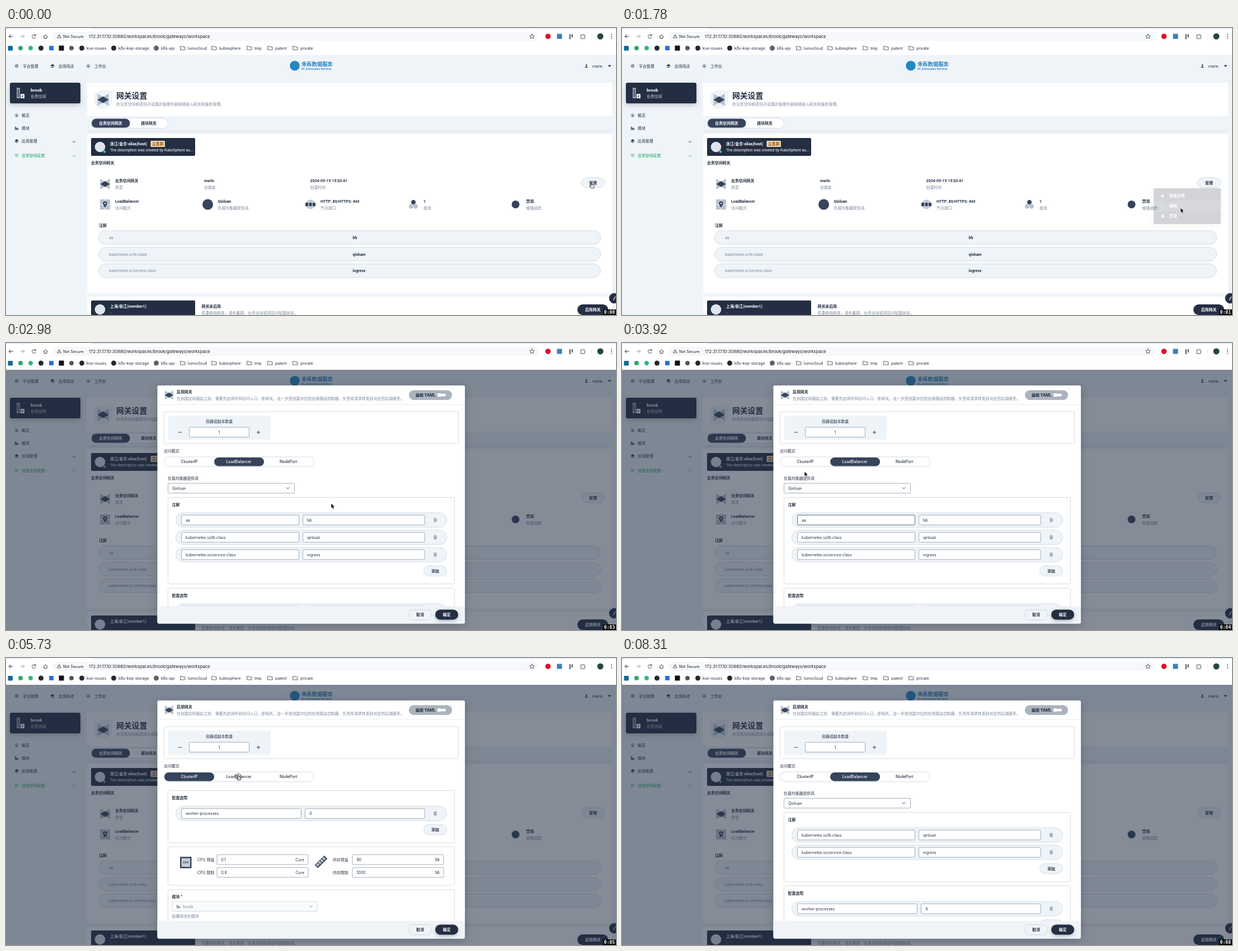
An HTML page for the animation above (8910 ms loop, 1090 by 514 pixels).

```html
<!DOCTYPE html>
<html lang="zh-CN">
<head>
<meta charset="utf-8">
<title>Gateway settings</title>
<style>
html, body { margin: 0; width: 100%; height: 100%; overflow: hidden; background: #eff4f9; }
svg { display: block; }
text { font-family: Roboto, "Noto Sans CJK SC", "Noto Sans CJK", sans-serif; white-space: pre; }
.ui text { font-family: Inter, "Noto Sans CJK SC", "Noto Sans CJK", sans-serif; }
#clock { font-family: "DejaVu Sans Mono", monospace; }
.hover .first { stroke: #36435c; }
#menu { filter: drop-shadow(0 3px 6px rgba(36, 46, 66, .25)); }
</style>
</head>
<body>
<svg id="stage" width="1090" height="514" viewBox="0 0 1090 514"></svg>
<script>
const LOOP = 8910, STEP = 150;
const INK = '#242e42', SLATE = '#36435c', GREY = '#79879c', LINE = '#ccd3db', PALE = '#eff4f9', MIST = '#b6c2cd';
const WORKSPACE = 'brook', USER = 'marlo', PROVIDER = 'Qinluan';

// Shapes; text is placed by its vertical middle
const box = (x, y, w, h, r = 0, fill = '#fff', stroke = 'none', extra = '') =>
  `<rect x="${x}" y="${y}" width="${w}" height="${h}" rx="${r}" fill="${fill}" stroke="${stroke}" stroke-width=".8" ${extra}/>`;
const dot = (x, y, r, fill, stroke = 'none') =>
  `<circle cx="${x}" cy="${y}" r="${r}" fill="${fill}" stroke="${stroke}"/>`;
const path = (d, stroke = INK, width = 1, fill = 'none') =>
  `<path d="${d}" fill="${fill}" stroke="${stroke}" stroke-width="${width}" stroke-linecap="round" stroke-linejoin="round"/>`;
const solid = (d, fill = INK) => `<path d="${d}" fill="${fill}"/>`;
const at = (x, y, content, scale = 1) => `<g transform="translate(${x} ${y}) scale(${scale})">${content}</g>`;
const text = (x, y, s, { size = 6.9, fill = INK, weight = 400, anchor = 'start' } = {}) =>
  `<text x="${x}" y="${y + size * .37}" font-size="${size}" fill="${fill}" font-weight="${weight}" text-anchor="${anchor}">${s}</text>`;
const bold = (x, y, s, opt) => text(x, y, s, { weight: 700, ...opt });
const grey = (x, y, s) => text(x, y, s, { fill: GREY });
const middle = (x, y, s, opt) => text(x, y, s, { anchor: 'middle', weight: 600, ...opt });
const chevron = (x, y, color = INK) => path(`M${x - 2.3} ${y - 1.2}l2.3 2.4 2.3-2.4`, color, .9);
const button = (x, y, w, h, label, dark) =>
  box(x, y, w, h, h / 2, dark ? INK : PALE, dark ? 'none' : LINE) +
  middle(x + w / 2, y + h / 2, label, { fill: dark ? '#fff' : INK });
const pair = (x, y, title, note) => bold(x, y, title) + grey(x, y + 11.5, note);

// Icons
const gateway = (x, y, scale) => at(x, y,
  solid('M-10-11L0-5 10-11V11L0 5-10 11z', MIST) + solid('M-10 0L0-6 10 0 0 6z', SLATE), scale);
const gear = (x, y, color) => dot(x, y, 2.5, 'none', color) + dot(x, y, .9, color);
const layers = (x, y) => solid(`M${x - 3.5} ${y - 1}l3.5-2.2 3.5 2.2-3.5 2z`) + path(`M${x - 3} ${y + 1.2}l3 1.6 3-1.6`);
const gauge = (x, y) => dot(x, y, 2.9, 'none', GREY) + solid(`M${x} ${y - 2}l1.3 3.6h-2.6z`);
const blocks = (x, y, c = SLATE) => box(x - 3, y - 3, 1.6, 6, 0, c) + box(x - .8, y - 1, 1.8, 4, 0, c) + box(x + 1.6, y, 1.6, 3, 0, c);
const person = (x, y) => dot(x, y - 1.6, 1.5, SLATE) + solid(`M${x - 3} ${y + 3}q3-4.5 6 0z`, SLATE);
const hexagon = (x, y, fill) => solid(`M${x} ${y - 4.4}l3.8 2.2v4.4l-3.8 2.2-3.8-2.2v-4.4z`, fill);
const folder = (x, y) => path(`M${x - 4} ${y - 3.2}h3l1 1.2h4v5h-8z`, '#474b50', .9);
const trash = (x, y) => path(`M${x - 2.6} ${y - 2}h5.2M${x - 1} ${y - 3.2}h2`, GREY, .9) +
  path(`M${x - 2} ${y - .8}v3.8h4v-3.8M${x} ${y - .8}v3.4`, GREY, .8, '#c7cfd8');

function browser() {
  const dark = '#3c4043';
  const marks = [[135, 'kse-issues'], [192, 'k8s-kep-storage'], [268, 'k8s-api']];
  const folders = [[316, 'lumocloud'], [372, 'kubesphere'], [435, 'tmp'], [472, 'patent'], [517, 'private']];
  return `<g class="ui">${box(0, 0, 1090, 48)}${box(0, 0, 1090, 1.2, 0, '#d3e3fd')}${box(46, 0, 108, 1.2)}` +
    box(84, 7, 868, 16, 8, '#f6f8fc') + box(87, 9, 56, 12, 6, '#fff', '#e3e6ea') +
    path('M12 15H5.5M8.3 12l-3 3 3 3') + path('M26 15h6.5M29.7 12l3 3-3 3', '#9a9da1') +
    path('M52.5 13a3.3 3.3 0 1 0 .5 3.3M53 11.4v2.2h-2.3', dark) +
    path('M67 15l3.5-3.2 3.5 3.2M68 14.5v4h5v-4', dark) +
    path('M95 11.8l3.4 6h-6.8zM95 14v1.7', INK, .8) +
    text(102, 15, 'Not Secure', { weight: 500 }) +
    text(148, 15, `172.31.17.10:30880/workspaces/${WORKSPACE}/gateways/workspace`, { size: 7.7, fill: '#1f1f1f' }) +
    path('M940 10.8l1.2 2.8 3 .3-2.3 2 .7 3-2.6-1.6-2.6 1.6.7-3-2.3-2 3-.3z', dark, .8) +
    dot(968.5, 15, 4.8, '#e0112b') + box(984.5, 10.5, 9, 9, 1, '#3f7fb5') +
    [0, 1, 2, 3, 4].map(i => box(1006.5 + i % 2 * 4, 11.5 + (i >> 1) * 3, 2.5, 2.2, 0, dark)).join('') +
    path('M1027.5 12.5h2a1.2 1.2 0 0 1 2.4 0h2v2.3a1.2 1.2 0 0 1 0 2.4v1.8h-6.4z', dark, .9) +
    box(1046, 10, .7, 10, 0, '#d3e3fd') + dot(1062, 15, 5.5, '#26473f') +
    [11.5, 15, 18.5].map(y => dot(1082, y, .9, dark)).join('') +
    box(3.5, 32, 8.5, 8.5, 1, '#126b9c') + dot(26, 36, 4, '#2da66c') + dot(44, 36, 4, '#35b87d') +
    dot(62.5, 36, 4.5, '#24292f') + box(77, 32, 8, 8, 1, '#2870dd') + box(94.5, 31.5, 9, 9, 0, '#111') +
    dot(117, 36, 4, '#55585c') + marks.map(([x, s], i) => dot(x + .5, 36, 4.5, i < 2 ? '#24292f' : '#5f6368') + text(x + 9, 36, s)).join('') +
    folders.map(([x, s]) => folder(x, 36) + text(x + 9, 36, s)).join('') + '</g>';
}

function sidebar() {
  const green = '#55bc8a';
  return box(7, 98, 126, 37, 3, INK, 'none', 'style="filter:drop-shadow(0 3px 4px rgba(36,46,66,.25))"') +
    box(19, 107, 6, 19, 0, '#8f9bab') + box(20.5, 110, 3, 13, 0, '#5d6b80') + box(26, 118, 7, 8, 1, '#fff') +
    dot(29.5, 122, 1.3, INK) + bold(44, 111, WORKSPACE, { size: 8, fill: '#fff' }) + text(44, 122.5, '业务空间', { fill: '#d5dce4' }) +
    gauge(19, 156.5) + text(28, 156.5, '概览') + blocks(19, 179.5) + text(28, 179.5, '模块') +
    layers(19, 202.5) + text(28, 202.5, '应用管理') + chevron(121.5, 204) +
    gear(19, 228, green) + bold(28, 228, '业务空间设置', { fill: green }) + chevron(121.5, 229, green);
}

function page() {
  const annotations = [['aa', 'bb'], ['kubernetes.io/lb.class', PROVIDER.toLowerCase()], ['kubernetes.io/service.class', 'ingress']];
  return box(0, 48, 1090, 466, 0, PALE) +
    gear(19, 68, SLATE) + text(30, 68, '平台管理') + layers(83, 68) + text(94, 68, '应用商店') +
    gauge(147, 68) + text(158, 68, '工作台') +
    dot(516, 67.5, 8.8, '#2388c6') + bold(528, 65, '禾栎数据服务', { size: 9.3, fill: '#1f7fbd' }) +
    text(528, 73.5, 'HL Informatics Services', { size: 5, fill: '#1f7fbd', weight: 500 }) +
    person(1037, 68) + text(1048, 68, USER) + solid('M1075.5 66.5h6l-3 3.4z') +
    sidebar() +
    box(145, 98, 938, 60) + solid('M157 128q0-17 17-17h16v17q0 17-17 17-16 0-16-17z', PALE) + gateway(173.5, 128.5, 1) +
    bold(197, 121, '网关设置', { size: 13.8 }) + grey(197, 136, '在业务空间和项目中设置并管理外部网络接入网关和服务管理。') +
    box(145, 183, 938, 4, 0, '#e6ecf2') +
    box(152.5, 161.5, 137, 18, 9, '#fff', LINE) + box(153, 162.5, 68.5, 16, 8, SLATE) +
    middle(187, 170.5, '业务空间网关', { fill: '#fff', weight: 700 }) + middle(255, 170.5, '模块网关', { weight: 700 }) +
    box(145, 190, 938, 285) +
    box(152, 197, 186, 32, 2, INK) + dot(168, 213, 9.3, '#dfe5ec') + dot(176, 221.5, 2.3, '#55bc8a') +
    bold(186, 207, '浙江/金华-alias(host)', { fill: '#fff' }) + box(258.5, 202, 25.5, 11, 1, '#f5d9ad') +
    middle(271.2, 207.5, '主集群', { fill: '#8d5b23' }) +
    text(186, 218.5, 'The description was created by KubeSphere au...', { fill: '#fff' }) +
    bold(152, 241.5, '业务空间网关') +
    gateway(177, 279.5, .86) + pair(195, 273.5, '业务空间网关', '类型') + pair(354, 273.5, USER, '创建者') +
    pair(543.5, 273.5, '2024-09-19 15:20:41', '创建时间') + button(1028.5, 268, 41, 18, '管理') +
    [0, 1, 2, 3].map(i => box(168 + i % 2 * 9.5, 307 + (i >> 1) * 9.5, 8.5, 8.5, 0, MIST)).join('') +
    solid('M177 322l-3.2-6a3.7 3.7 0 1 1 6.4 0z', SLATE) + dot(177, 314.3, 1.2, '#fff') + pair(195, 310.5, 'LoadBalancer', '访问模式') +
    dot(360.5, 316, 9.5, SLATE) + pair(378.5, 310.5, PROVIDER, '负载均衡器提供商') +
    dot(544, 316, 8.5, MIST) + [0, 1, 2].map(i => box(535 + i * 6.3, 313, 5.4, 6, 0, SLATE)).join('') +
    path('M541 308v16M547 308v16', '#fff', .8) + pair(562, 310.5, 'HTTP: 80/HTTPS: 443', '节点端口') +
    hexagon(728, 312, SLATE) + hexagon(723.8, 319.5, MIST) + hexagon(732, 319.5, MIST) + pair(746, 310.5, '1', '副本') +
    dot(910.5, 316, 7, SLATE) + pair(929.5, 310.5, '禁用', '链路追踪') +
    bold(166, 353, '注解') +
    annotations.map(([key, value], i) => {
      const y = 363 + i * 29.7;
      return box(165.5, y, 897, 24.6, 12.3, PALE, LINE) + grey(184, y + 12.5, key) + bold(619.5, y + 12.5, value);
    }).join('') +
    box(145, 481, 938, 33) + box(152, 488, 186, 30, 2, INK) + dot(168, 504, 9.3, '#dfe5ec') +
    bold(186, 498.5, '上海/张江(member1)', { fill: '#fff' }) + text(186, 510, '-', { fill: '#fff' }) +
    bold(349.5, 498.5, '网关未启用') + grey(349.5, 510, '若要使用网关，请在集群、业务空间或项目中配置网关。') +
    button(1021, 495, 55, 19, '启用网关', true) +
    dot(1087, 484, 9.3, INK) + path('M1085.5 487l3-5.5', '#fff', 1.2);
}

function menu() {
  const white = '#fff';
  return box(950, 287, 120, 64, 2, INK) + box(950, 310, 120, 18, 0, SLATE) +
    dot(966, 300.5, 2.3, white) + path('M964 320.5l3.8-4', white) + box(964.3, 334.5, 4, 5, 0, white) +
    ['查看详情', '编辑', '禁用'].map((s, i) => text(978, 300.5 + i * 18.2, s, { fill: white, weight: 600 })).join('');
}

// Dialog parts
const field = (x, y, w, value, extra = '') => box(x, y - 8.8, w, 17.6, 1.5, '#fff', '#8d99aa', extra) + text(x + 7.5, y, value);
const frame = (y, h) => box(289.5, y, 512, h, 2, '#fff', LINE);
const row = (y, key, value, split, extra) =>
  box(303.5, y - 13, 484, 26, 13, PALE, LINE) + field(313.5, y, split - 313.5, key, extra) +
  field(split + 7, y, 741 - split, value) + trash(767, y);
const addButton = y => button(746.5, y - 9, 41, 18, '添加');
const options = y => frame(y, 93.5) + bold(296.5, y + 13, '配置选项') +
  row(y + 41, 'worker-processes', '4', 527.5) + addButton(y + 70);

function modes(active) {
  return box(282.5, 204, 268, 17.5, 8.7, '#fff', LINE) + box(283 + active * 89, 205, 89, 15.5, 7.7, SLATE) +
    ['ClusterIP', 'LoadBalancer', 'NodePort'].map((s, i) =>
      middle(327.5 + i * 88.6, 212.8, s, { fill: i === active ? '#fff' : INK, weight: 500 })).join('');
}

function balancer(rows) {
  const end = 338.5 + rows.length * 31;
  return modes(1) + text(289, 242.5, '负载均衡器提供商') + field(289.5, 260, 226, PROVIDER) + chevron(503.5, 260) +
    frame(276.5, end - 276.5) + bold(296.5, 289, '注解') +
    rows.map(([key, value], i) => row(317 + i * 31, key, value, 523.5, i ? '' : 'class="first"')).join('') +
    addButton(end - 23.3) + options(end + 7.5);
}

function clusterIp() {
  const limit = (x, y, label, value, unit) => text(x, y, label) + field(x + 35, y, 163, value) +
    text(x + 191, y, unit, { anchor: 'end' });
  return modes(0) + options(237.5) + frame(338, 69) +
    box(311, 356, 20.5, 20.5, 1, SLATE) + box(313.5, 358.5, 15.5, 15.5, 0, '#c3cdd8') + middle(321.2, 366, 'CPU', { size: 5 }) +
    limit(342, 361, 'CPU 预留', '0.1', 'Core') + limit(342, 384, 'CPU 限制', '0.8', 'Core') +
    `<g transform="rotate(-45 563 365)">${box(551, 361, 24, 8, 0, SLATE)}${[0, 1, 2, 3].map(i => box(553 + i * 5.3, 362, 4, 5, 0, MIST)).join('')}</g>` +
    limit(584, 361, '内存预留', '90', 'Mi') + limit(584, 384, '内存限制', '1000', 'Mi') +
    frame(415, 80) + bold(296.5, 427.5, '模块 <tspan fill="#ca2621">*</tspan>') +
    box(296.5, 436, 260, 17.5, 1.5, '#f9fbfd', LINE) + blocks(308, 445, GREY) + grey(316, 445, WORKSPACE) +
    chevron(545, 445, GREY) + grey(296.5, 462, '部署网关的模块');
}

function dialog() {
  const pairs = [['aa', 'bb'], ['kubernetes.io/lb.class', PROVIDER.toLowerCase()], ['kubernetes.io/service.class', 'ingress']];
  return box(0, 48, 1090, 466, 0, INK, 'none', 'opacity=".55"') +
    box(270.5, 76, 549.5, 426.5, 3, '#fff', 'none', 'style="filter:drop-shadow(0 4px 8px rgba(36,46,66,.3))"') +
    box(270.5, 110, 549.5, .8, 0, '#e3e9ef') + gateway(291.3, 93.3, .75) +
    bold(305, 87, '启用网关') + grey(305, 99, '在创建应用路由之前，需要先启用外网访问入口，即网关。这一步是创建对应的应用路由控制器，负责将请求转发到对应的后端服务。') +
    box(720, 84.5, 77, 17.5, 8.7, '#abb4be') + bold(732, 93.3, '编辑 YAML') + box(774, 91, 12, 4.6, 2.3, '#fff') + dot(774, 93.3, 3.2, '#fff') +
    '<g clip-path="url(#view)">' +
    box(282.5, 123, 526, 57.5, 2, '#fff', LINE) + box(289.5, 130, 183.5, 43, 1, PALE) + middle(381, 140, '容器组副本数量', { weight: 400 }) +
    box(327.5, 151, 107, 17.5, 1.5, '#fff', '#8d99aa') + middle(381, 160, '1', { weight: 400 }) +
    path('M308 160h5.5M448.3 160h5.5M451 157.2v5.5', INK, .9) + text(282, 193.5, '访问模式') +
    `<g id="full">${balancer(pairs)}</g><g id="cluster">${clusterIp()}</g><g id="reduced">${balancer(pairs.slice(1))}</g></g>` +
    box(270.5, 471, 549.5, 31.5, 3, '#f0f4f8') + button(719.5, 477.5, 41, 18, '取消') +
    `<g style="filter:drop-shadow(0 2px 3px rgba(36,46,66,.35))">${button(767, 477.5, 41, 18, '确定', true)}</g>`;
}

const pointers = {
  arrow: path('M0 0v9l2-1.9 1.5 3.4 1.6-.7-1.5-3.2h2.8z', '#fff', .7, '#000'),
  hand: path('M-.8.6q.8-1.2 1.6 0v3l3.3.9q1 .4.8 1.8l-.7 3.5h-5l-2.7-3.7q0-1.2 1.2-.7l1.5 1z', '#111', .8, '#fff'),
  beam: path('M-1.5-4Q0-4 0-3V3Q0 4-1.5 4M1.5-4Q0-4 0-3M0 3Q0 4 1.5 4', '#111', .9)
};

const stage = document.getElementById('stage');
stage.innerHTML = '<defs><clipPath id="view"><rect x="270" y="111" width="550" height="360"/></clipPath></defs>' +
  page() + `<g id="menu" class="ui">${menu()}</g><g id="dialog" class="ui">${dialog()}</g>` + browser() +
  `<g id="cursor">${Object.entries(pointers).map(([id, s]) => `<g id="${id}">${s}</g>`).join('')}` +
  '<circle id="ring" cx="0" cy="3" r="5" fill="none" stroke="#333" stroke-width=".8"/></g>' +
  box(1067, 504, 23, 10, 0, '#000') + '<text id="clock" x="1068.5" y="512" font-size="8.2" font-weight="700" fill="#fff"></text>';

// time, x, y, pointer used until the next entry
const route = [
  [0, 1046, 277, 'hand'], [750, 1046, 277, 'hand'], [900, 1036, 290, 'hand'], [1350, 998, 321, 'hand'],
  [1800, 998, 322, 'arrow'], [2400, 998, 322, 'arrow'], [2850, 720, 300, 'arrow'], [3300, 303, 262, 'arrow'],
  [3450, 306, 240, 'arrow'], [3600, 322, 292, 'arrow'], [3750, 335, 315, 'beam'], [3900, 326, 230, 'arrow'],
  [4200, 327, 209, 'hand'], [4800, 327, 209, 'hand'], [5400, 415, 209, 'hand'], [5850, 415, 209, 'hand'],
  [6150, 400, 240, 'arrow'], [6450, 352, 322, 'beam'], [6600, 348, 327, 'beam'], [7050, 342, 314, 'beam'],
  [7350, 420, 330, 'arrow'], [7800, 940, 470, 'arrow'], [7950, 987, 506, 'arrow'], [8100, 1020, 530, 'arrow'],
  [LOOP, 1020, 530, 'arrow']
];
const clicks = [450, 1650, 4500, 5700];

function pointerAt(time) {
  const i = Math.max(0, route.findIndex(key => key[0] > time) - 1);
  const [t0, x0, y0, kind] = route[i], [t1, x1, y1] = route[i + 1];
  const k = (time - t0) / (t1 - t0);
  return { x: x0 + (x1 - x0) * k, y: y0 + (y1 - y0) * k, kind };
}
const overField = ({ x, y }) => x > 313 && x < 523 && y > 306 && y < 329;
const element = id => document.getElementById(id);
const show = (id, visible) => element(id).style.display = visible ? '' : 'none';

function draw(now) {
  const t = now % LOOP, s = Math.max(0, Math.floor((t + 20) / STEP) * STEP);
  const cursor = pointerAt(Math.min(s, LOOP - 1));
  const open = s >= 1950;
  element('menu').style.opacity = s < 450 || open ? 0 : s < 600 ? .5 : s < 1800 ? 1 : .2;
  show('dialog', open);
  show('full', s < 4650);
  show('cluster', s >= 4650 && s < 5850);
  show('reduced', s >= 5850);
  stage.classList.toggle('hover', open && (overField(cursor) || overField(pointerAt(Math.max(0, s - STEP)))));
  element('cursor').setAttribute('transform', `translate(${cursor.x} ${cursor.y})`);
  for (const id in pointers) show(id, id === cursor.kind);
  show('ring', clicks.includes(s));
  element('clock').textContent = '0:0' + Math.min(8, Math.floor((t + 100) / 1000));
  requestAnimationFrame(() => draw(performance.now() - start));
}
const start = performance.now();
draw(0);
</script>
</body>
</html>
```
